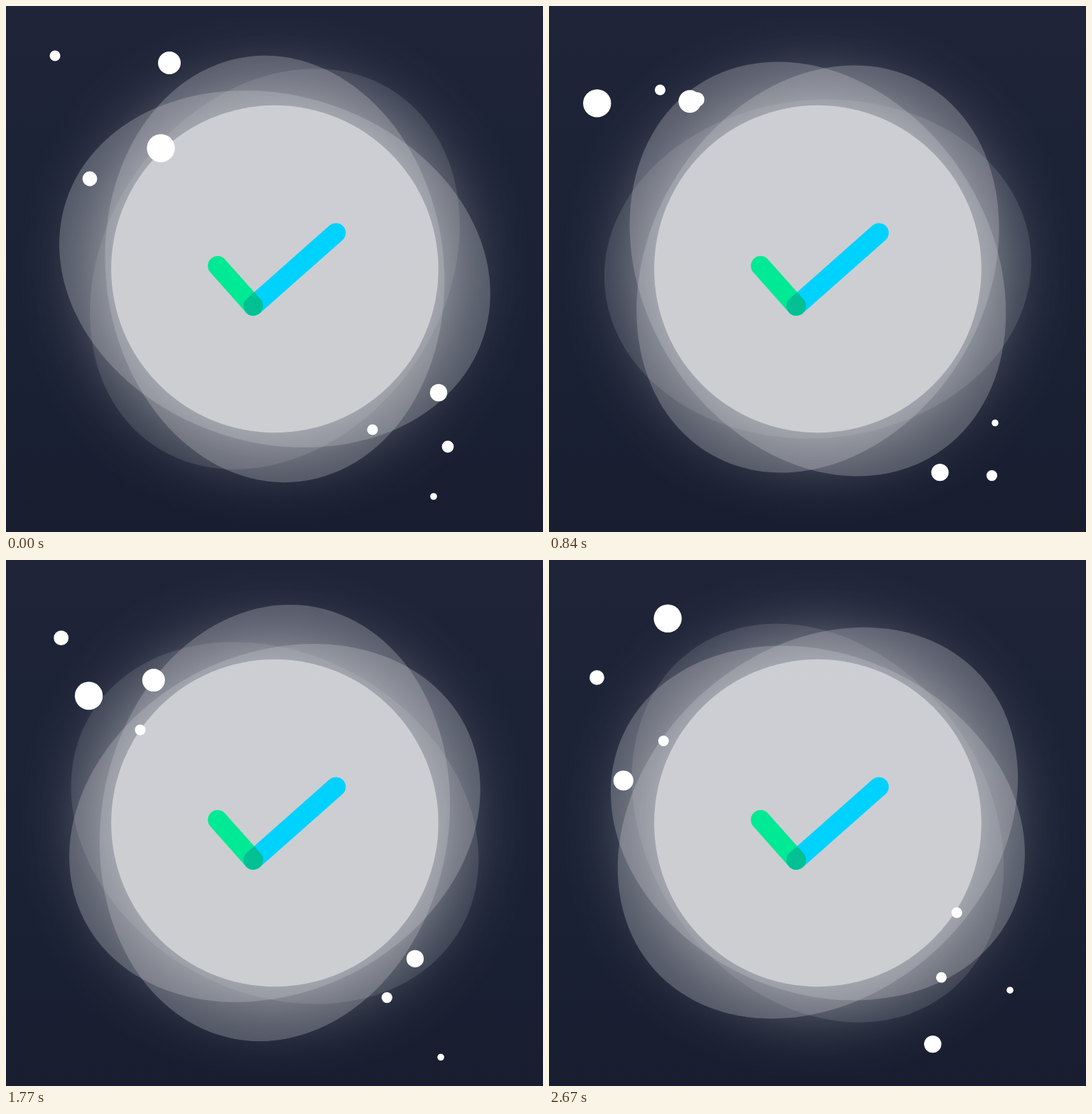
Write an HTML page that moves like this. It is 756x740 px and loops after 2.7 s.

```html
<!DOCTYPE html>
<html lang="en">
<head>
<meta charset="utf-8">
<title>Success check</title>
<style>
  html, body { margin: 0; width: 100%; height: 100%; overflow: hidden; background: #1b2135; }
  svg { display: block; width: 756px; height: 740px; }
  .glow { filter: blur(60px); }
  .check { isolation: isolate; fill: none; stroke-width: 27.6; stroke-linecap: round; }
  .short { mix-blend-mode: multiply; }
</style>
</head>
<body>
<svg viewBox="0 0 756 740">
  <defs>
    <linearGradient id="sky" x2="0" y2="1">
      <stop offset="0" stop-color="#1f2438"/>
      <stop offset=".5" stop-color="#1b2235"/>
      <stop offset="1" stop-color="#181e30"/>
    </linearGradient>
  </defs>
  <rect width="756" height="740" fill="url(#sky)"/>
  <g opacity=".78" fill="#fff">
    <circle class="glow" cx="378.4" cy="370" r="230.3"/>
    <g id="blobs"></g>
    <circle cx="378.4" cy="370" r="230.3"/>
  </g>
  <g class="check">
    <path d="M348.2 422 464.5 319.2" stroke="#00d2ff"/>
    <path class="short" d="M298 365.6 348.2 422" stroke="#00e994"/>
  </g>
  <g id="dots" fill="#fff"></g>
</svg>
<script>
const LOOP = 2700, STEP = 30;

// Rotation in degrees, s in seconds
const blobs = [
  { rx: 309, ry: 244.2, alpha: .28, turn: s => 18 + s * (45 + s * (2.9 - 1.1 * s)) },
  { rx: 301, ry: 237.9, alpha: .28, turn: s => 83 + s * (57 + s * (6 * s - 20.4)) },
  { rx: 301, ry: 237.9, alpha: .14, turn: s => 125 + s * (73 + s * (2.4 * s - 18.5)) }
];

// Key points of each path, passed at an even pace
const dots = [
  { r: 19.7, path: "218,200 82,165 74,127 107,194 141,152 168,80" },
  { r: 16, path: "230,80 105,178 275,98 225,150 160,226 103,313", shrink: 2 },
  { r: 10.4, path: "118,243 300,124 117,145 80,112 80,118 67,167" },
  { r: 7.5, path: "69,70 156,75 152,158 182,224 198,266 160,254" },
  { r: 12.2, path: "609,544 566,654 543,638 545,562 662,592 536,684" },
  { r: 7.6, path: "516,596 616,650 611,660 541,632 546,562 575,494" },
  { r: 4.8, path: "602,690 662,600 596,597 592,696 676,672 648,603" },
  { r: 8.4, path: "622,620 552,587", blink: true }
];

function add(parent, tag, attrs) {
  const el = document.createElementNS("http://www.w3.org/2000/svg", tag);
  for (const key in attrs) el.setAttribute(key, attrs[key]);
  return document.getElementById(parent).appendChild(el);
}

// Catmull-Rom through evenly timed points, p from 0 to 1
function along(points, p) {
  const last = points.length - 1;
  const i = Math.min(last - 1, Math.floor(p * last)), u = p * last - i;
  const get = n => points[Math.max(0, Math.min(last, n))];
  const [a, b, c, d] = [i - 1, i, i + 1, i + 2].map(get);
  return b.map((v, k) => v + u / 2 * (c[k] - a[k]
    + u * (2 * a[k] - 5 * v + 4 * c[k] - d[k] + u * (3 * (v - c[k]) + d[k] - a[k]))));
}

for (const b of blobs) {
  b.el = add("blobs", "ellipse", { cx: 378.4, cy: 370, rx: b.rx, ry: b.ry, opacity: b.alpha });
}
for (const d of dots) {
  d.points = d.path.split(" ").map(pair => pair.split(",").map(Number));
  d.el = add("dots", "circle", {});
}

function radius(d, p) {
  if (d.blink) return d.r * Math.min(1, Math.max(0, 10 * Math.abs(p - .5) - 4));
  return d.r - (d.shrink || 0) * Math.max(0, 3 * p - 2);
}

function draw(t) {
  const p = t / LOOP;
  for (const b of blobs) b.el.setAttribute("transform", `rotate(${b.turn(t / 1000)} 378.4 370)`);
  for (const d of dots) {
    const [x, y] = along(d.points, p);
    d.el.setAttribute("cx", x);
    d.el.setAttribute("cy", y);
    d.el.setAttribute("r", radius(d, p));
  }
}

const start = performance.now();
function tick() {
  const t = (performance.now() - start) % LOOP;
  draw(Math.floor(t / STEP) * STEP);
  requestAnimationFrame(tick);
}
tick();
</script>
</body>
</html>
```
